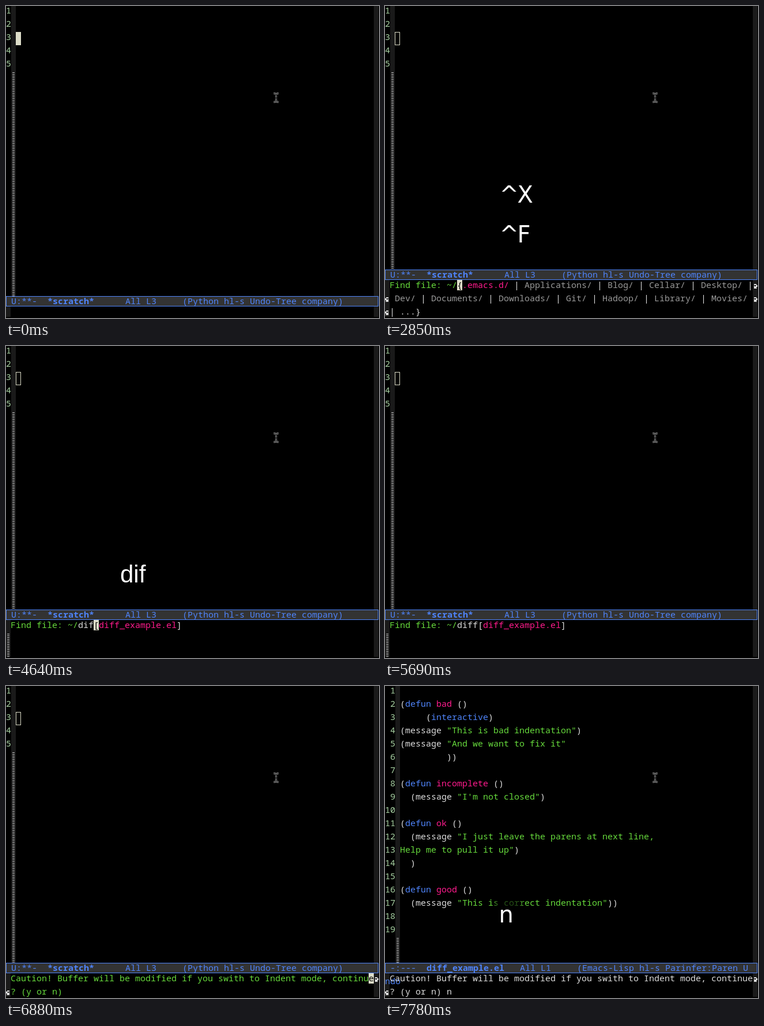
Recreate the animation shown at these times as an HTML page. Size 647 px wide and 541 px high, loop 8 s.

```html
<!DOCTYPE html>
<html lang="en">
<head>
<meta charset="utf-8">
<title>Editor session</title>
<style>
  html, body { margin: 0; width: 100%; height: 100%; overflow: hidden; background: #000; }
  svg { display: block; width: 647px; height: 541px; }
  text { font: 500 15px "Noto Sans Mono", "DejaVu Sans Mono", monospace; white-space: pre; }
  .white { fill: #dcdcdc; }
  .grey { fill: #999; }
  .green { fill: #66d93c; }
  .pink { fill: #ff1b8d; }
  .blue { fill: #4f84fa; }
  .bold { fill: #4f84fa; font-weight: 700; }
  .num { fill: #a9d3a4; }
  .under { fill: #000; }
  .cursor { fill: #dcdcc8; }
  .hollow { fill: none; stroke: #dcdcc8; }
  .black { fill: #000; }
  .fringe { fill: #1a1a1a; }
  .mark { fill: #dcdcdc; }
  .dashes { fill: none; stroke: #c8c8c8; }
  .mode { fill: #333; stroke: #4f84fa; }
  .key { fill: #fff; font: 40px "DejaVu Sans", sans-serif; }
  .word { fill: #fff; font: 42px "Liberation Sans", Arial, sans-serif; }
  .shade { fill: #000; opacity: .65; filter: blur(4px); }
  .ibeam path { fill: none; stroke: #8a8a8a; stroke-width: 3; }
  .ibeam path + path { stroke: #000; stroke-width: 1; }
</style>
</head>
<body>
<svg id="stage" viewBox="0 0 647 541" xmlns="http://www.w3.org/2000/svg"></svg>
<script>
const LOOP = 8000, CHAR = 9, ROW = 23, COLS = 70;
const stage = document.getElementById('stage');
const scenes = [];

function add(parent, tag, attrs, text) {
  const node = document.createElementNS('http://www.w3.org/2000/svg', tag);
  for (const name in attrs) node.setAttribute(name, attrs[name]);
  if (text !== undefined) node.textContent = text;
  parent.append(node);
  return node;
}

const box = (g, cls, x, y, width, height) =>
  add(g, 'rect', { class: cls, x, y, width, height });

// A group visible during the given [from, to, opacity] spans.
function scene(...spans) {
  const g = add(stage, 'g', {});
  scenes.push({ g, spans });
  return g;
}

// Sets coloured runs on the character grid, wrapping at the window edge.
function write(g, x, top, runs) {
  let col = 0, row = 0;
  for (const [cls, str] of runs) {
    for (let piece of str.split(/(\n)/)) {
      if (piece === '\n') { col = 0; row++; continue; }
      while (piece) {
        if (col === COLS) { col = 0; row++; }
        const part = piece.slice(0, COLS - col);
        const px = x + col * CHAR, py = top + row * ROW;
        if (cls === 'under') box(g, 'cursor', px, py, CHAR, 18);
        add(g, 'text', { class: cls, x: px, y: py + 14 }, part);
        col += part.length;
        piece = piece.slice(part.length);
      }
    }
  }
  return row;
}

function dashes(g, x, top, bottom) {
  let d = '';
  for (let y = top + 1.5; y < bottom; y += 3) d += `M${x} ${y}h4`;
  add(g, 'path', { class: 'dashes', d });
}

// 8x8 fringe arrow, one byte per row.
function arrow(g, x, top, rows) {
  let d = '';
  rows.forEach((bits, y) => {
    for (let i = 0; i < 8; i++)
      if (bits >> (7 - i) & 1) d += `M${x + i} ${top + 7 + y}h1v1h-1z`;
  });
  add(g, 'path', { class: 'mark', d });
}
const LEFT = [0x3c, 0x7c, 0xc0, 0xe4, 0xfc, 0x7c, 0x3c, 0x7c];
const RIGHT = [0x3c, 0x3e, 0x03, 0x27, 0x3f, 0x3e, 0x3c, 0x3e];

function buffer(g, lines, digits) {
  const edge = digits * CHAR, end = lines * ROW - 1;
  box(g, 'black', 0, 0, 647, 541);
  box(g, 'fringe', edge, 0, 8, 503);
  box(g, 'fringe', 638, 0, 8, 503);
  for (let i = 1; i <= lines; i++)
    write(g, 0, (i - 1) * ROW - 1, [['num', String(i).padStart(digits)]]);
  dashes(g, edge + 2, end, 503);
}

function modeLine(g, y, status, name, info) {
  add(g, 'rect', { class: 'mode', x: .5, y: y + .5, width: 645, height: 17 });
  write(g, 0, y, [['blue', ` ${status}  `], ['bold', name], ['blue', info]]);
  box(g, 'black', 646, y, 1, 18);
}
const scratchMode = (g, y) =>
  modeLine(g, y, 'U:**-', '*scratch*', '      All L3     (Python hl-s Undo-Tree company)');

function miniArea(g, y) {
  box(g, 'black', 0, y, 647, 541 - y);
  box(g, 'fringe', 0, y + 18, 8, 521 - y);
  box(g, 'fringe', 638, y + 18, 8, 521 - y);
}

function prompt(g, top, runs) {
  const last = write(g, 8, top, runs);
  for (let i = 0; i < last; i++) {
    arrow(g, 638, top + i * ROW, RIGHT);
    arrow(g, 0, top + (i + 1) * ROW, LEFT);
  }
  if (!last) dashes(g, 2, top + ROW, 539);
}

function findFile(g, typed, names, lit) {
  const single = names.length === 1;
  const runs = [['green', 'Find file: ~/'], ['white', typed],
    [lit ? 'under' : 'white', single ? '[' : '{'], ['pink', names[0]]];
  for (const name of names.slice(1)) runs.push(['white', ' | '], ['grey', name]);
  runs.push(['white', single ? ']' : ' | ...}']);
  prompt(g, 475, runs);
}

// Scratch buffer
buffer(scene([0, 7780]), 5, 1);
box(scene([0, 300], [750, 1350], [1800, 2250]), 'cursor', 17, 45, 9, 23);
box(scene([2850, 7630]), 'hollow', 17.5, 45.5, 8, 22);

let g = scene([0, 2850], [7630, 7780]);
miniArea(g, 503);
scratchMode(g, 503);
scratchMode(scene([7630, 7780]), 480);

// Finding the file
g = scene([2850, 6130]);
miniArea(g, 457);
scratchMode(g, 457);

const dirs = ('.emacs.d/ Applications/ Blog/ Cellar/ Desktop/ Dev/ Documents/ Downloads/ ' +
  'Git/ Hadoop/ Library/ Movies/').split(' ');
const dNames = ('Desktop/ Dev/ Documents/ Downloads/ diff_example.el dotfiles/ .emacs.d/ ' +
  'Hadoop/ Videos/ Cloud/ Media/ Old/').split(' ');
const hit = ['diff_example.el'];
findFile(scene([2850, 3300], [3900, 4340]), '', dirs, true);
findFile(scene([3300, 3900]), '', dirs, false);
findFile(scene([4340, 4640]), 'd', dNames, true);
findFile(scene([4640, 4940]), 'dif', hit, true);
findFile(scene([4940, 5540], [5980, 6130]), 'diff', hit, true);
findFile(scene([5540, 5980]), 'diff', hit, false);

// Confirmation
const caution = 'Caution! Buffer will be modified if you swith to Indent mode, continu';
g = scene([6130, 7630]);
miniArea(g, 480);
scratchMode(g, 480);
prompt(g, 498, [['green', caution], ['under', 'e'], ['green', '? (y or n) ']]);

// Opened file
const source = `
(defun bad ()
     (interactive)
(message "This is bad indentation")
(message "And we want to fix it"
         ))

(defun incomplete ()
  (message "I'm not closed")

(defun ok ()
  (message "I just leave the parens at next line,
Help me to pull it up")
  )

(defun good ()
  (message "This is correct indentation"))`;

function paint(token, i) {
  if (i % 2 === 0) return ['white', token];
  if (token[0] === '"') return ['green', token];
  return [/^(defun|interactive)$/.test(token) ? 'blue' : 'pink', token];
}

g = scene([7780, LOOP]);
buffer(g, 19, 2);
write(g, 26, -1, source.split(/("[^"]*"|defun|interactive|(?<=defun )\w+)/).map(paint));
miniArea(g, 480);
modeLine(g, 480, '-:---', 'diff_example.el',
  '   All L1     (Emacs-Lisp hl-s Parinfer:Paren Undo');
prompt(g, 498, [['white', caution + 'e? (y or n) n']]);
box(g, 'shade', 191, 368, 46, 52);

// Keystroke display
function chord(g, letter, y) {
  add(g, 'text', { class: 'key', x: 198.6, y }, '^');
  add(g, 'text', { class: 'key', x: 229.5, y }, letter);
}
const word = (g, str) => add(g, 'text', { class: 'word', x: 198, y: 410 }, str);

chord(scene([2550, 2850]), 'X', 410);
chord(scene([2850, 3150], [3150, 3300, .5]), 'X', 341);
chord(scene([2850, 3450], [3450, 3600, .5]), 'F', 410);
word(scene([4340, 4640]), 'd');
word(scene([4640, 4940]), 'dif');
word(scene([4940, 5540], [5540, 5690, .5]), 'diff');

g = scene([6130, 6730], [6730, 6880, .5]);
add(g, 'path', { d: 'M223 380.3h3.5a7.4 7.4 0 0 1 0 14.8H211', fill: 'none', stroke: '#fff', 'stroke-width': 3.6 });
add(g, 'path', { d: 'M202.5 395L212 386v18z', fill: '#fff' });

add(scene([7630, LOOP]), 'text', { class: 'key', x: 197.6, y: 410 }, 'n');

// Mouse pointer
g = add(stage, 'g', { class: 'ibeam' });
const beam = 'M464 151.5h2.5l2 2 2-2h2.5M468.5 153v12M467 159.5h3M464 166.5h2.5l2-2 2 2h2.5';
add(g, 'path', { d: beam });
add(g, 'path', { d: beam });

function draw(now) {
  const t = now % LOOP;
  for (const { g, spans } of scenes) {
    const span = spans.find(([from, to]) => t >= from && t < to);
    g.style.display = span ? '' : 'none';
    if (span) g.style.opacity = span[2] ?? 1;
  }
}

const start = performance.now();
function tick() {
  draw(performance.now() - start);
  requestAnimationFrame(tick);
}
tick();
</script>
</body>
</html>
```
